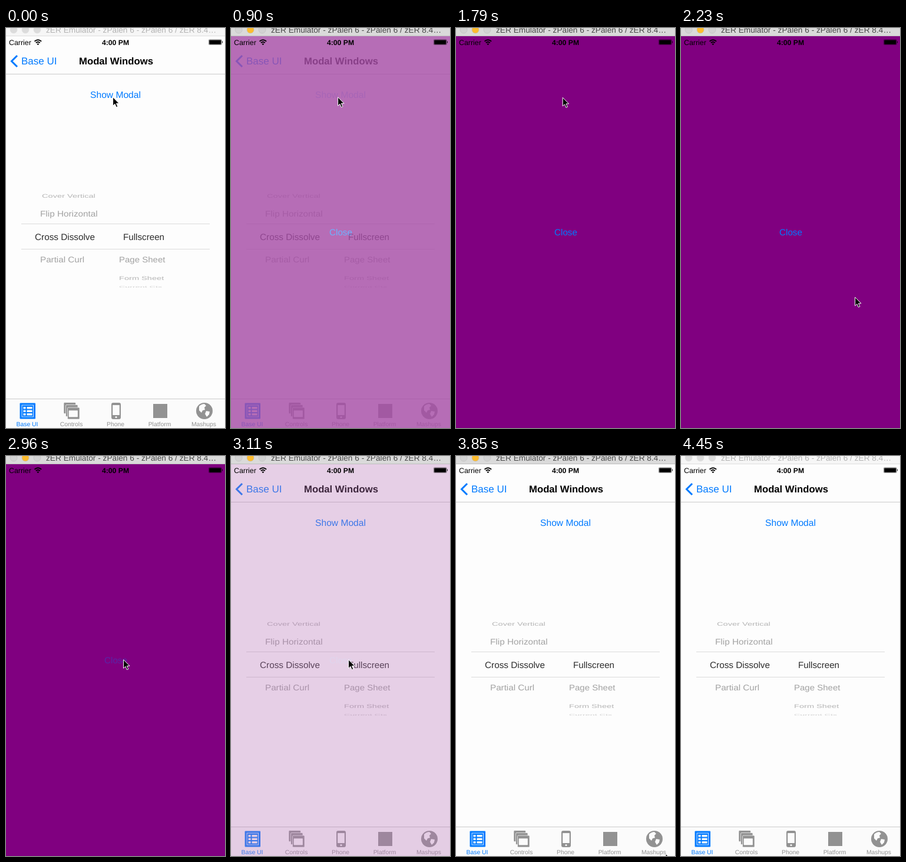
These frames come from a looping animation (372 px wide and 681 px high, 4550 ms). An HTML page:

```html
<!DOCTYPE html>
<html lang="en">
<head>
<meta charset="utf-8">
<title>Modal Windows</title>
<style>
  html, body { margin: 0; width: 100%; height: 100%; overflow: hidden; background: #fdfdfd; }
  svg { display: block; width: 372px; height: 681px; font-family: "Liberation Sans", Arial, sans-serif; text-rendering: geometricPrecision; }
  .blue { fill: #007aff; }
  .mid { text-anchor: middle; }
  .bold { font-weight: bold; }
  .rule { fill: #cbcbcb; }
  .thin { fill: #dadada; }
  .row { font-size: 15.2px; }
  .tabs { font-size: 10.4px; fill: #929292; }
  .hole { fill: #fbfbfb; }
  #bar { --face: #dadada; --edge: #bdbdbd; --ink: #484848; --light: #d2d2d2; --amber: #fdbc2f; }
  #bar.idle { --face: #f6f6f6; --edge: #dedede; --ink: #b2b2b2; --light: #dcdcdc; --amber: #dcdcdc; }
  #bar circle { fill: var(--light); stroke: var(--edge); stroke-width: .6; }
  #bar circle.amber { fill: var(--amber); }
</style>
</head>
<body>
<svg viewBox="0 0 372 681">
  <rect width="372" height="681" fill="#fdfdfd"/>

  <g id="page">
    <path d="M19 47L9.5 56.5L19 66" fill="none" stroke="#007aff" stroke-width="3"/>
    <text x="26" y="62" font-size="17" class="blue">Base UI</text>
    <text x="187" y="62" font-size="16.7" class="mid bold">Modal Windows</text>
    <rect y="78" width="372" height="1" class="rule"/>
    <text id="show" x="186" y="118.7" font-size="15.6" class="blue mid">Show Modal</text>

    <g id="picker" class="row"></g>
    <rect x="26" y="333" width="320" height="1" class="thin"/>
    <rect x="26" y="376" width="320" height="1" class="thin"/>

    <rect y="631" width="372" height="50" fill="#fbfbfb"/>
    <rect y="631" width="372" height="1" class="rule"/>
    <g class="tabs">
      <g class="blue">
        <rect x="23.5" y="638.5" width="26.5" height="27" rx="1"/>
        <rect x="27" y="642" width="19.5" height="20" fill="none" stroke="#cfe6ff"/>
        <path d="M29.5 645h4v3.5h-4zm6 0h9v3.5h-9zM29.5 650.5h4v3.5h-4zm6 0h9v3.5h-9zM29.5 656h4v3.5h-4zm6 0h9v3.5h-9z" class="hole"/>
      </g>
      <g stroke="#fbfbfb" stroke-width=".7">
        <rect x="98" y="637.5" width="20.5" height="19" rx="1.5"/>
        <rect x="101.5" y="641.5" width="20.5" height="20" rx="1.5"/>
        <rect x="104.5" y="646" width="20.5" height="20" rx="1.5"/>
        <path d="M107 651.5h14.5v10.5h-14.5z" class="hole"/>
      </g>
      <rect x="179" y="638" width="16" height="28" rx="3"/>
      <rect x="181.2" y="642" width="11.6" height="17" class="hole"/>
      <circle cx="187" cy="662.5" r="1.6" class="hole"/>
      <rect x="250" y="640" width="24" height="24"/>
      <circle cx="337" cy="652" r="14"/>
      <path d="M328 644q4-4 9-4l3 3-3 3 1 4-4 1-2 4-4-4zM340 652l6 1-1 5-4 4-3-5z" class="hole"/>
      <g id="labels" class="mid"></g>
    </g>
  </g>

  <g id="modal">
    <rect id="sheet" y="14" width="372" height="667"/>
    <text id="close" x="186.5" y="353" class="row blue mid">Close</text>
  </g>

  <text x="5" y="28.5" font-size="12.4">Carrier</text>
  <g fill="none" stroke="#000" stroke-width="1.8">
    <path d="M48.5 22.8q5.8-5 11.6 0M50.8 25.2q3.5-3 7 0"/>
    <path d="M54.3 29.2l-2-2.2q2-1.5 4 0z" fill="#000" stroke="none"/>
  </g>
  <text x="186" y="28.5" font-size="12.2" class="mid bold">4:00 PM</text>
  <rect x="344.3" y="19.7" width="22" height="8.8" rx="1.5" fill="none" stroke="#000" stroke-width=".4"/>
  <rect x="345.2" y="20.5" width="20.2" height="7.2" rx=".8"/>
  <path d="M367.2 22q2 2 0 4z"/>

  <g id="bar">
    <rect width="372" height="14" fill="var(--face)"/>
    <rect y="13" width="372" height="1" fill="var(--edge)"/>
    <circle cx="13" cy="3" r="6"/>
    <circle cx="33" cy="3" r="6" class="amber"/>
    <circle cx="53" cy="3" r="6"/>
    <text x="68" y="8" font-size="13.7" fill="var(--ink)">zER Emulator - zPalen 6 - zPalen 6 / zER 8.4…</text>
  </g>

  <path id="cursor" d="M.6.8V15.4L4 12.3 6.3 17.8 8.8 16.8 6.4 11.4H11Z" stroke="#fff" stroke-width="1"/>
</svg>
<script>
const LOOP = 4550;
const $ = id => document.getElementById(id);

// Picker rows: text, x, baseline, font size, vertical squash of the wheel, colour
const rows = [
  ["Cover Vertical", 61, 288.8, 14.6, .62, "#b6b6b6"],
  ["Flip Horizontal", 58, 321, 15.3, .92, "#a2a2a2"],
  ["Cross Dissolve", 49, 361, 15.3, 1, "#2c2c2c"],
  ["Partial Curl", 58, 399.3, 15.2, .92, "#a2a2a2"],
  ["Fullscreen", 199, 361, 15.2, 1, "#2c2c2c"],
  ["Page Sheet", 192, 399.3, 15, .92, "#a2a2a2"],
  ["Form Sheet", 192, 428.5, 14.6, .62, "#b6b6b6"],
  ["Current Ctx", 192, 441.8, 14.3, .28, "#d0d0d0"],
];
$("picker").innerHTML = rows.map(([text, x, y, size, squash, fill]) =>
  `<text transform="translate(${x} ${y}) scale(1 ${squash})" style="font-size:${size}px" fill="${fill}">${text}</text>`).join("");

$("labels").innerHTML = ["Base UI", "Controls", "Phone", "Platform", "Mashups"].map((name, i) =>
  `<text x="${36 + 75 * i}" y="677.5" class="${i ? "" : "blue"}">${name}</text>`).join("");

// Time, cursor tip x, y
const cursorSteps = [
  [0, 181, 117], [1790, 180.6, 117.6], [1930, 261.5, 302], [2080, 288, 439],
  [2230, 295, 457.5], [2380, 232, 376], [2520, 218, 363], [2670, 198.5, 347],
  [2820, 199, 346], [3410, 270, 474], [3550, 305, 546], [3700, 334, 614],
  [3850, 355.5, 676.5], [4000, 400, 700],
];
// Time, dissolve progress, sheet colour, opacity of the "Show Modal" and "Close" buttons
const modalSteps = [
  [0, 0, "#800080", 1, 1], [900, .57, "#800080", .35, 1], [1040, 1, "#8a008a", 1, 1],
  [1190, 1, "#800080", 1, 1], [2960, 1, "#800080", 1, .3], [3110, .18, "#800080", 1, .3],
  [3260, 0, "#800080", 1, 1],
];
const stepAt = (steps, t) => steps.findLast(step => step[0] <= t);
const fade = (id, opacity) => $(id).setAttribute("opacity", opacity);

function draw(t) {
  const [, x, y] = stepAt(cursorSteps, t);
  const [, progress, fill, show, close] = stepAt(modalSteps, t);
  $("cursor").setAttribute("transform", `translate(${x} ${y})`);
  $("sheet").setAttribute("fill", fill);
  fade("page", 1 - progress);
  fade("modal", progress);
  fade("show", show);
  fade("close", close);
  $("bar").classList.toggle("idle", t < 900 || t >= 4450);
}

const start = performance.now();
function tick() {
  draw((performance.now() - start) % LOOP);
  requestAnimationFrame(tick);
}
tick();
</script>
</body>
</html>
```
